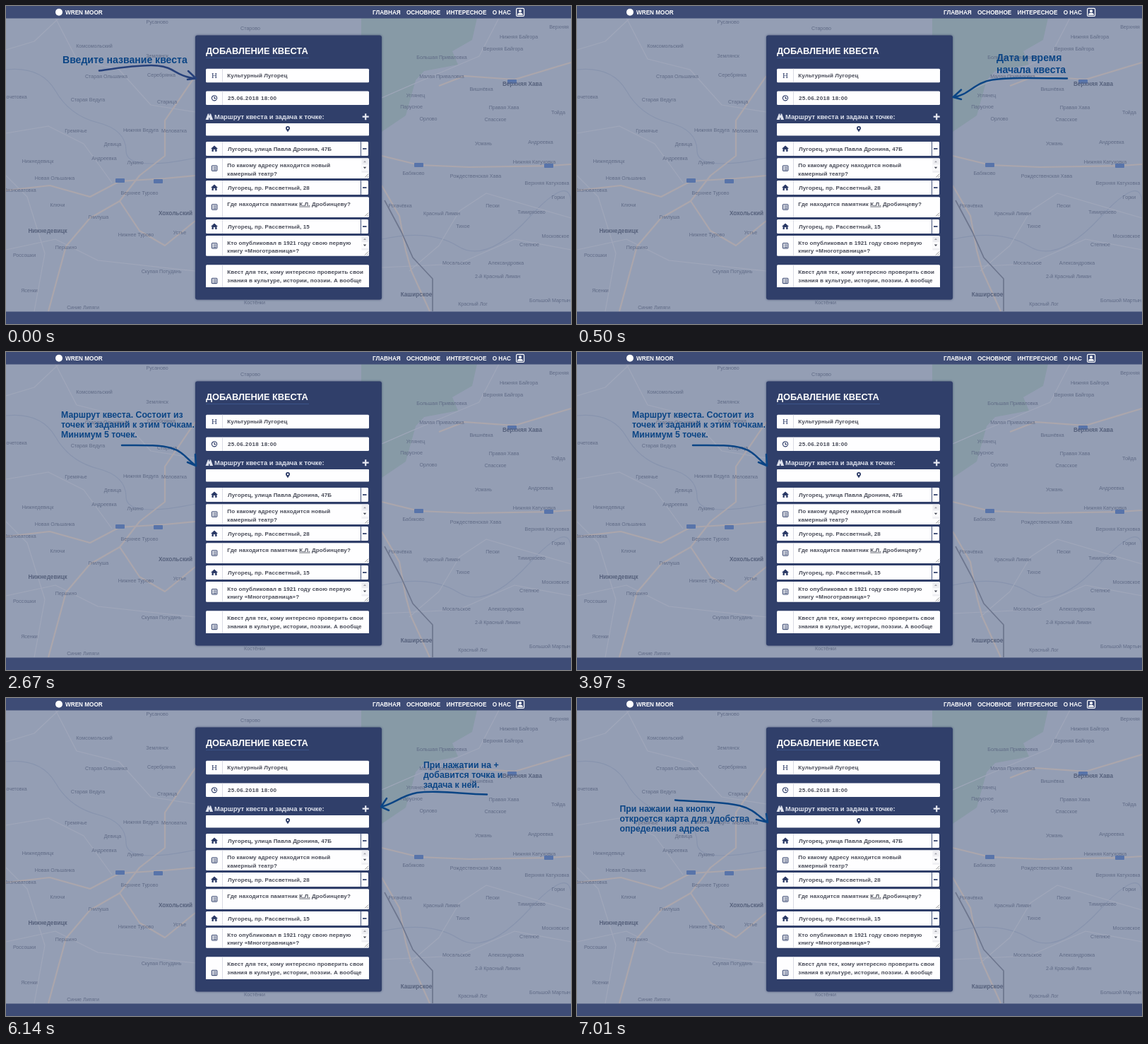
Recreate the animation shown at these times as an HTML page. Size 800 by 450 pixels, loop 8000 ms.

```html
<!DOCTYPE html>
<html lang="ru">
<head>
<meta charset="utf-8">
<style>
html, body { margin: 0; width: 100%; height: 100%; overflow: hidden; }
svg { display: block; width: 800px; height: 450px; font: bold 8.2px "Liberation Sans", Arial, sans-serif; }
.field { font-size: 8px; fill: #474a57; letter-spacing: .12px; }
.place { font-size: 7.1px; fill: #606b86; text-anchor: middle; font-weight: normal; }
.town { font-size: 8.2px; fill: #56617c; font-weight: bold; }
.note { fill: #0b4585; }
.note path { fill: none; stroke-width: 2.5; stroke-linecap: round; stroke-linejoin: round; }
</style>
</head>
<body>
<svg id="stage" viewBox="0 0 800 450">
  <defs>
    <filter id="soft"><feGaussianBlur stdDeviation=".75"/></filter>
    <filter id="shade" x="-10%" y="-10%" width="120%" height="120%"><feGaussianBlur stdDeviation="1.5"/></filter>
    <clipPath id="view"><rect x="268" y="41" width="264" height="357"/></clipPath>
  </defs>
  <rect width="800" height="450" fill="#949eb4"/>
  <g id="map" filter="url(#soft)" fill="none" stroke-linejoin="round"></g>
  <g fill="#3e4c76"><rect width="800" height="17.5"/><rect y="432.5" width="800" height="17.5"/></g>
  <g id="header" fill="#fff"></g>
  <rect x="268" y="41.5" width="264" height="374" rx="3" fill="#1c2850" opacity=".6" filter="url(#shade)"/>
  <rect x="268" y="41.5" width="264" height="374" rx="3" fill="#303f6a"/>
  <g id="form" clip-path="url(#view)"></g>
  <g id="notes"></g>
</svg>
<script>
const $ = id => document.getElementById(id);
const text = (s, x, y, attrs = '') => `<text x="${x}" y="${y}" ${attrs}>${s}</text>`;
const rect = (x, y, w, h, attrs = '') => `<rect x="${x}" y="${y}" width="${w}" height="${h}" ${attrs}/>`;
const path = (d, attrs = '') => `<path d="${d}" ${attrs}/>`;

// Map
const minorRoads = ['M0 62L40 50L75 17', 'M70 17L100 75L160 90L205 140L268 150', 'M0 180L60 170L110 195L150 250',
  'M0 345L70 330L130 360L268 375', 'M40 432L55 350L30 270L0 240', 'M571 375L613 339L642 290L680 265L800 300',
  'M532 370L640 365L720 330L800 345', 'M698 17L670 71L571 113L532 130'];
const mainRoads = ['M0 261L62 254L119 270L161 248L225 244L268 240', 'M268 99L225 162L225 212L189 240L161 276L189 318L225 339L268 304',
  'M161 276L119 300L85 340L60 432', 'M532 212L585 225L656 228L769 226L800 224', 'M532 254L557 297L566 346L574 375L600 432',
  'M613 113L649 99L720 104L783 85L800 80'];
const rivers = ['M0 90Q50 85 70 120T130 165T170 205T268 215', 'M532 330Q600 315 640 340T740 300T800 280'];
const places = `Русаново,214,25|Старово,346,34|Комсомольский,125,59|Землянск,214,73|Старая Ольшанка,142,102
Серебрянка,220,100|Старая Ведуга,116,135|Старица,228,138|Кочетовка,13,131|Меловатка,238,179|Гремячье,99,179
Нижняя Ведуга,191,178|Девица,151,198|Андреевка,139,218|Лукино,183,224|Нижнедевицк,45,222|Новая Ольшанка,69,246
Верхнее Турово,189,267|Нижнее Турово,184,326|Ключи,73,284|Гнилуша,131,301|Устье,246,323|Першино,85,344|Россошки,26,355
Скупая Потудань,220,378|Ясенки,33,405|Синие Липяги,109,429|Вязноватовка,20,263|Костёнки,352,422
Верхняя,783,32|Нижняя Байгора,726,46|Верхняя Байгора,704,63|Большая Приваловка,617,75|Малая Приваловка,617,102
Углянец,580,129|Парусное,574,145|Орлово,598,162|Вишнёвка,673,120|Правая Хава,705,146|Спасское,693,163|Тойда,782,153
Усмань,676,197|Андреевка,757,195|Нижняя Катуховка,748,223|Рождественская Хава,665,243|Бабяково,577,239
Рогачёвка,558,285|Верхняя Катуховка,766,253|Красный Лиман,617,296|Тимирязево,744,294|Горки,782,273
Пески,689,285|Тихое,647,314|Московское,778,328|Степное,741,340|Мосальское,638,366|Александровка,708,366
2-й Красный Лиман,696,385|Красный Лог,661,424|Большой Мартын,770,419`.split(/[|\n]/).map(s => s.split(','));
const towns = [['Хохольский', 240, 296], ['Нижнедевицк', 59, 321], ['Верхняя Хава', 731, 113], ['Каширское', 581, 411]];
const signs = [[155, 244], [209, 245], [578, 222], [762, 223], [710, 104]];

$('map').innerHTML =
  path('M503 17H667L660 48L632 64L640 83L592 92L580 105L566 155L532 178V42H503Z', 'fill="#879aa6"') +
  rivers.map(d => path(d, 'stroke="#8894ae" stroke-width="1.2"')).join('') +
  minorRoads.map(d => path(d, 'stroke="#a0a7ba" stroke-width="1.2"')).join('') +
  mainRoads.map(d => path(d, 'stroke="#aba6ac" stroke-width="2.2"')).join('') +
  path('M536 275L560 320L576 356L604 386V432', 'stroke="#6d768e" stroke-width="1.7"') +
  signs.map(([x, y]) => rect(x, y, 13, 6, 'rx="1" fill="#5874aa"')).join('') +
  places.map(([s, x, y]) => text(s, x, y, 'class="place"')).join('') +
  towns.map(([s, x, y]) => text(s, x, y, 'class="place town"')).join('');

// Header
$('header').innerHTML = '<circle cx="75" cy="8.7" r="5"/>' + text('WREN MOOR', 84, 11.6) +
  [['ГЛАВНАЯ', 519], ['ОСНОВНОЕ', 567], ['ИНТЕРЕСНОЕ', 623.5], ['О НАС', 688.7]].map(([s, x]) => text(s, x, 11.6)).join('') +
  rect(722.6, 3.4, 11, 11, 'rx="1.5" fill="none" stroke="#fff" stroke-width="1.2"') +
  '<circle cx="728" cy="7.2" r="2"/>' + path('M724 12.8Q724 9.8 728 9.8T732 12.8Z');

// Form
const ink = 'fill="#2b3a66"';
const home = y => path(`M290 ${y}l5-4.5l5 4.5h-1.5v4h-2.3v-3h-2.4v3h-2.3v-4z`, ink);
const list = y => rect(291.3, y - 3.7, 7.6, 7.4, 'rx=".6" fill="none" stroke="#2b3a66" stroke-width="1"') +
  path(`M292.6 ${y - 1.6}h5M292.6 ${y + .3}h5M292.6 ${y + 2.2}h5`, 'stroke="#2b3a66" stroke-width=".9" stroke-dasharray="1 .7 3.3"');
const box = (y, h, w = 231) => rect(283, y, w, h, 'rx="1.5" fill="#fefeff"') + path(`M306.5 ${y}v${h}`, 'stroke="#d0d2dd" stroke-width=".8"');
const lines = (y, ...rows) => rows.map((s, i) => text(s, 313.3, y + i * 11.7, 'class="field"')).join('');
const address = (y, s) => box(y, 20, 230) + home(y + 10) + text(s, 314, y + 13, 'class="field"') +
  path(`M502.5 ${y}v20`, 'stroke="#42517a" stroke-width="1"') + rect(505, y + 9.2, 5.5, 1.7, ink);
const grip = y => path(`M508 ${y}l5-5M511 ${y}l2-2`, 'stroke="#777" stroke-width=".8"');
const scroller = y => rect(503.5, y + .5, 9.5, 20, 'fill="#eeeef2"') + rect(503.5, y + 9, 9.5, 9, 'fill="#fafafc"') +
  path(`M506 ${y + 6}l2-2.3l2 2.3z`, 'fill="#a2a3aa"') + path(`M505.8 ${y + 12.5}l2.2 2.4l2.2-2.4z`, 'fill="#444853"');
const task = (y, scroll, ...rows) => box(y, 28.8) + list(y + 14.3) + lines(y + 12.5, ...rows) + (scroll ? scroller(y) : '') + grip(y + 27.5);

$('form').innerHTML =
  text('ДОБАВЛЕНИЕ КВЕСТА', 283, 68.2, 'fill="#fff" font-size="12.8"') +
  path('M283 73.5h146', 'stroke="#3b5489"') +
  box(88.7, 19.5) + text('H', 295, 102.3, `${ink} text-anchor="middle" style="font:11px 'Liberation Serif',serif"`) +
  lines(101.3, 'Культурный Лугорец') +
  box(120.5, 19.4) + path('M298.6 130.3a3.6 3.6 0 1 1-7.2 0a3.6 3.6 0 1 1 7.2 0M295 128v2.6h2', 'fill="none" stroke="#2b3a66" stroke-width="1.1"') +
  text('25.06.2018 18:00', 314, 133.2, 'class="field" style="letter-spacing:.42px"') +
  path('M285.8 152.5h1.6l-.2 2h1.5l-.2-2h1.6l3 8.5h-4.5l-.2-2.7h-1.2l-.2 2.7h-4.4z', 'fill="#dfe3ee"') +
  text('Маршрут квеста и задача к точке:', 295, 160.3, 'fill="#dfe3ee" font-size="9.37"') +
  path('M504.7 156.7h9M509.2 152.2v9', 'stroke="#e6e8f1" stroke-width="2.2"') +
  rect(283, 166, 231, 17.5, 'rx="1" fill="#fefeff"') +
  path('M399 178.6C397.8 175.8 396 174.9 396 173a3 3 0 0 1 6 0C402 174.9 400.2 175.8 399 178.6ZM400.2 173a1.2 1.2 0 1 0-2.4 0a1.2 1.2 0 1 0 2.4 0', `${ink} fill-rule="evenodd"`) +
  address(192, 'Лугорец, улица Павла Дронина, 47Б') +
  task(215.3, true, 'По какому адресу находится новый', 'камерный театр?') +
  address(247, 'Лугорец, пр. Рассветный, 28') +
  task(270.2, false, 'Где находится памятник <tspan text-decoration="underline">К.Л.</tspan> Дробинцеву?') +
  address(302, 'Лугорец, пр. Рассветный, 15') +
  task(325, true, 'Кто опубликовал в 1921 году свою первую', 'книгу «Многотравница»?') +
  box(366.3, 40) + list(389) +
  lines(379, 'Квест для тех, кому интересно проверить свои', 'знания в культуре, истории, поэзии. А вообще', 'можно просто хорошо погулять');

// Notes
const note = (size, x, y, leading, rows, arrow, color = '#0b4585') => '<g class="note">' +
  rows.map((s, i) => text(s, x, y + i * leading, `font-size="${size}"`)).join('') + path(arrow, `stroke="${color}"`) + '</g>';
const scenes = [
  [0, note(14.06, 80, 81, 0, ['Введите название квеста'],
    'M132 91.5C157 88 195 82 215 84.5C240 87 239 99 268 102.5M258 92L269 102.5L257 104', '#26407a')],
  [500, note(14.06, 594, 78, 17, ['Дата и время', 'начала квеста'],
    'M694 102.5C650 102 615 101 588 104.5C563 108 555 126 533 129M544 118.5L532.5 129L544 132')],
  [2670, note(12.3, 78, 93, 14, ['Маршрут квеста. Состоит из', 'точек и заданий к этим точкам.', 'Минимум 5 точек.'],
    'M164 132C190 132 217 131 234 136C252 141 257 153 269 161M257 156L269 161L268 145')],
  [4840, note(12.3, 591, 99, 14, ['При нажатии на +', 'добавится точка и', 'задача к ней.'],
    'M681 136.5C645 136 612 130 582 134C560 138 551 149 531 154M539 142L531 154L542 159')],
  [7010, note(12.3, 60.5, 161, 14, ['При нажаии на кнопку', 'откроется карта для удобства', 'определения адреса'],
    'M139 144.5C166 147 204 146 231 152.5C252 158 257 168 270 176M254 172L270 176L268 164')]
];
let shown;
function draw() {
  const t = performance.now() % 8000;
  const scene = scenes.findLast(([start]) => t >= start);
  if (scene !== shown) $('notes').innerHTML = (shown = scene)[1];
  requestAnimationFrame(draw);
}
draw();
</script>
</body>
</html>
```
